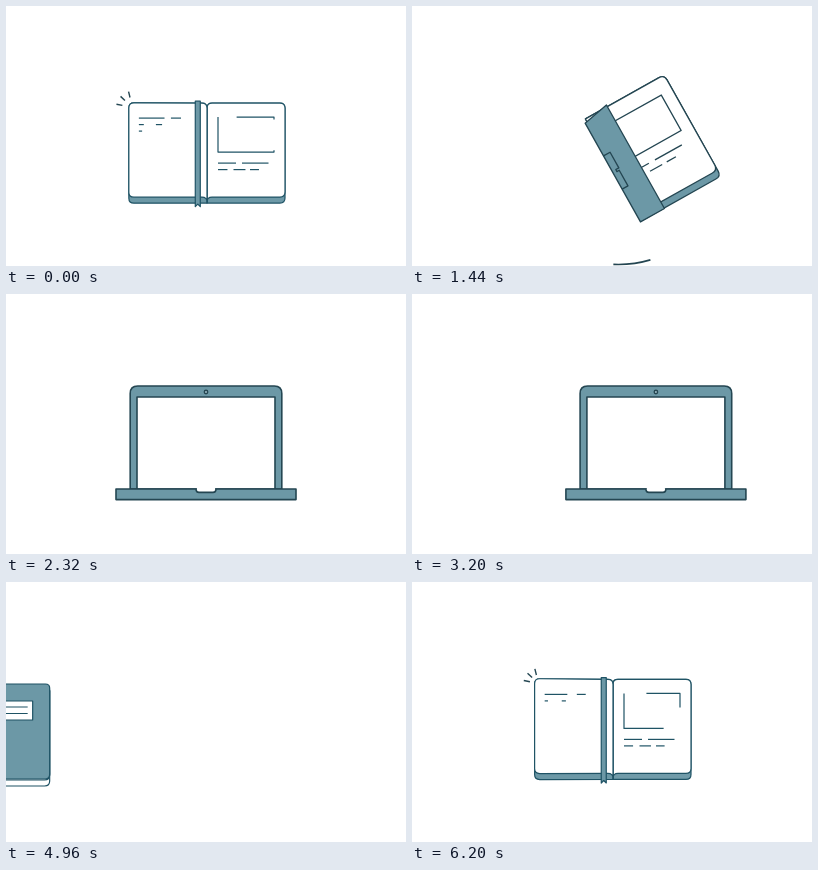
These frames come from a looping animation (400 px wide and 260 px high, 6240 ms). An HTML page:

```html
<!DOCTYPE html>
<html lang="en">
<head>
<meta charset="utf-8">
<title>Notebook to laptop</title>
<style>
html, body { margin: 0; width: 100%; height: 100%; overflow: hidden; background: #fff; }
svg { display: block; width: 100vw; height: 100vh; }
</style>
</head>
<body>
<svg id="stage" viewBox="0 0 400 260" fill="none" stroke-linejoin="round"></svg>
<script>
const LOOP = 6240;
const LEAD = 600; // the cover starts to open this long before the loop point
const TEAL = [108, 152, 166];
const WHITE = [255, 255, 255];
const INK = '#1f5365';
const DARK = '#244652';
const PAGE = 78;

const stage = document.getElementById('stage');
const clamp = v => Math.min(1, Math.max(0, v));
const span = (t, from, to) => clamp((t - from) / (to - from));
const lerp = (a, b, k) => a + (b - a) * k;
const easeOut = u => 1 - (1 - u) ** 2;
const mix = k => `rgb(${WHITE.map((c, i) => Math.round(lerp(c, TEAL[i], k)))})`;
const fillTeal = mix(1);
const path = (d, fill = 'none', extra = '') => `<path d="${d}" fill="${fill}" ${extra}/>`;
const line = (x1, y1, x2, y2) => path(`M${x1} ${y1}L${x2} ${y2}`);
const group = (body, transform, extra = '') => `<g transform="${transform}" ${extra}>${body}</g>`;

// Dashes as [x, length], relative to the spine.
const leftRows = [
  [[-68, 28], [-36, 11]],
  [[-68, 8], [-51, 10]],
  [[-68, 30]],
  [[-68, 22], [-41, 16]],
  [[-68, 15], [-48, 9]],
  [[-68, 26], [-37, 12]],
  [[-68, 18]]
];
const rightRows = [
  [[11, 18], [35, 26.5]],
  [[11, 9.5], [26.5, 12], [43, 9]]
];

function rows(list, y, t, start) {
  return list.map((row, i) => {
    const from = start + 88 * i;
    const k = easeOut(span(t, from, from + 270));
    return k ? row.map(([x, len]) => line(x, y + 6.5 * i, x + len * k, y + 6.5 * i)).join('') : '';
  }).join('');
}

// Half of the open book: the board edge below, the white leaf above it.
function leaf(w, bulge, curve, bottom, edge, face) {
  const r = w * 0.065, top = -50 - bulge, low = bottom + bulge / 3, end = 50 + bulge / 3;
  const start = `M0 ${-50 + curve}Q0 -50 ${r * curve / 5} -50L${w - r} ${top}Q${w} ${top} ${w} ${top + 5}`;
  return path(`${start}L${w} ${end - 5}Q${w} ${end} ${w - r} ${end}L0 50Z`, edge) +
    path(`${start}L${w} ${low - 5}Q${w} ${low} ${w - r} ${low}L${r * curve / 5} ${bottom}Q0 ${bottom} 0 ${bottom + curve}Z`, face);
}

function frontCover(w, bulge) {
  const r = w * 0.055, top = -52 - bulge, low = 43 + bulge * 0.8;
  return path(`M0 -52L${w - r} ${top}Q${w} ${top} ${w} ${top + 4}L${w} ${low - 5}Q${w} ${low} ${w - r} ${low}L0 43Z`, fillTeal) +
    group(path('M16.5 -35H61V-16H16.5Z', '#fff') + line(21, -29, 56, -29) + line(21, -22.5, 56, -22.5),
      `scale(${w / PAGE} 1)`);
}

function ribbon(w, top, bottom) {
  return group(path(`M-2.5 ${top}H2.5V${bottom}L0 ${bottom - 2.5}L-2.5 ${bottom}Z`, fillTeal),
    `translate(${9.2 * w / PAGE} 0)`);
}

function leftLeaf(w, bulge, t) {
  return leaf(w, bulge, 5, 44, fillTeal, '#fff') +
    group(rows(leftRows, -35, t, 410), `scale(${-w / PAGE} 1)`);
}

function figure(t) {
  const n = 1 - span(t, 397, 797);
  return path('M11 -36V-1H67V-36Z', 'none',
    `stroke-dasharray="${182 * (1 - n)} ${63 * n} ${81 * n} 400"`);
}

function ticks(t) {
  const grow = span(t, 480, 560);
  const inner = 8.7 + (t - 560) * 0.04;
  const outer = t < 560 ? lerp(5.5, 15, grow) : Math.min(17, 15 + (t - 560) * 0.033);
  if (t < 480 || inner >= outer) return '';
  return [[-0.98, -0.2], [-0.73, -0.68], [-0.24, -0.97]].map(([x, y]) =>
    line(126.5 + x * inner, 101.5 + y * inner, 126.5 + x * outer, 101.5 + y * outer)).join('');
}

function openingBook(t, x = 0) {
  const u = span(t, 0, 640);
  const p = u * (1 + u - u * u);
  const lift = Math.sin(Math.PI * p);
  const w = PAGE * Math.cos(Math.PI * p) * (1 + 0.1 * lift); // nearer parts look larger
  const bulge = 7 * lift;
  const mark = ribbon(w, lerp(-44, -52, p), lerp(58, 53.5, p));
  const right = leaf(PAGE, 0, 5 * p, 44, mix(p), '#fff') + rows(rightRows, 10, t, 260) + figure(t);
  const cover = w > 0 ? mark + frontCover(w, bulge) : leftLeaf(w, bulge, t) + mark;
  return group(right + cover, `translate(${201 + x} ${147 + 7 * (1 - p * p)})`,
    `stroke="${INK}" stroke-width="1.2"`) +
    `<g stroke="${DARK}" stroke-width="1.4">${ticks(t)}</g>`;
}

function swoosh(p) {
  const k = Math.sin(Math.PI * span(p, 0.05, 0.8));
  if (!k) return '';
  const mid = 83.8 - 135 * (p - 0.32);
  const at = deg => {
    const a = deg * Math.PI / 180;
    return `${206.5 + 113 * Math.cos(a)} ${145.5 + 113 * Math.sin(a)}`;
  };
  return path(`M${at(mid + 10.4 * k)}A113 113 0 0 0 ${at(mid - 10.4 * k)}`, 'none',
    `stroke="${DARK}" stroke-width="1.7"`);
}

// The book turns on its side; its right half becomes the lid, its left half the base.
function turningBook(t) {
  const p = span(t, 1840, 2480) ** 0.97;
  const g = span(p, 0.4, 0.9);
  const theta = Math.min(p, 0.34) * 331 * Math.PI / 180;
  const fold = -PAGE * Math.cos(theta);
  const k = span(p, 0.34, 1);
  const w = lerp(fold, -7.3, k);
  const size = 1 + 0.5 * p;
  const drift = Math.sin(Math.PI * p);
  const box = [lerp(11, 0, g), lerp(67, 65, g), lerp(-36, -42, g), lerp(-1, 42, g)];
  const lid = leaf(lerp(PAGE, 77, p), 0, 5 * (1 - clamp(p * 3)), lerp(44, 50, g), fillTeal, mix(g)) +
    rows(rightRows, 10, 2000, 0) +
    path(`M${box[0]} ${box[2]}H${box[1]}V${box[3]}H${box[0]}Z`, '#fff');
  let body = group(lid, `translate(${2.3 * drift} ${-2.1 * drift})`);
  if (fold < 0) {
    body += leftLeaf(w, 4.9 * Math.sin(theta), 2000) + ribbon(w, -52, 53.5);
  } else {
    const half = lerp(48.7, 61, k);
    const rise = 4.9 * Math.sin(theta) * (1 - k);
    const d = lerp(6.5, -2.6, k), y = lerp(16.4, 7, k), jog = lerp(3, 0, k);
    body += path(`M0 ${-half}L${w} ${-half - rise}V${half}H0Z`, fillTeal) +
      path(`M0 ${-y}H${d}V-1H${d - jog}V1H${d - jog / 4}V${y}H0`, k > 0.5 ? '#fff' : 'none');
  }
  return swoosh(p) + group(body,
    `translate(${lerp(201.3, 199.8, p)} ${147 + 48 * p ** 0.8}) rotate(${-90 * p}) scale(${size})`,
    `stroke="${DARK}" stroke-width="${(1.2 + 0.4 * p) / size}"`);
}

function laptop(t) {
  const s = easeOut(span(t, 2480, 2920));
  const x = 290 * span(t, 3600, 4240) ** 1.63;
  const top = lerp(80, 92, s);
  const side = lerp(63, 69, s);
  const base = lerp(91.5, 90, s);
  const notch = lerp(10.5, 10, s);
  const body =
    path(`M-75.8 195V${top + 7.5}Q-75.8 ${top} -68.3 ${top}H68.3Q75.8 ${top} 75.8 ${top + 7.5}V195Z`, fillTeal) +
    path(`M${-side} 195V${lerp(97, 103, s)}H${side}V195Z`, '#fff') +
    path(`M${-notch} 195Q${-notch} 198.4 ${3 - notch} 198.4H${notch - 3}Q${notch} 198.4 ${notch} 195`, '#fff', 'stroke="none"') +
    path(`M${-base} 195H${-notch}Q${-notch} 198.4 ${3 - notch} 198.4H${notch - 3}Q${notch} 198.4 ${notch} 195H${base}V205.6H${-base}Z`, fillTeal) +
    path(`M${1 - notch} 195H${notch - 1}`, 'none', 'stroke="#fff" stroke-width="2"') +
    `<circle cy="98" r="${1.7 * s}" fill="#9fbcc6" stroke-width="${1.4 * s}"/>`;
  return group(body, `translate(${200 + x} 0)`, `stroke="${DARK}" stroke-width="1.6"`);
}

function speedLines(t) {
  if (t < 4180 || t >= 4320) return '';
  const x1 = lerp(345.5, 384.5, span(t, 4240, 4320));
  const x2 = lerp(345.5, 384.5, span(t, 4180, 4240));
  return `<g stroke="${DARK}" stroke-width="1.5">${[121, 155, 189].map(y => line(x1, y, x2, y)).join('')}</g>`;
}

function scene(t) {
  if (t < 1840) return openingBook(t);
  if (t < 2480) return turningBook(t);
  if (t < 4320) return (t < 4240 ? laptop(t) : '') + speedLines(t);
  if (t <= 5520) return '';
  return openingBook(0, -291 * (1 - span(t, 5520, 6120)) ** 3);
}

const begin = performance.now();
function draw(now) {
  stage.innerHTML = scene((Math.max(0, now - begin) + LEAD) % LOOP);
  requestAnimationFrame(draw);
}
draw(begin);
</script>
</body>
</html>
```
